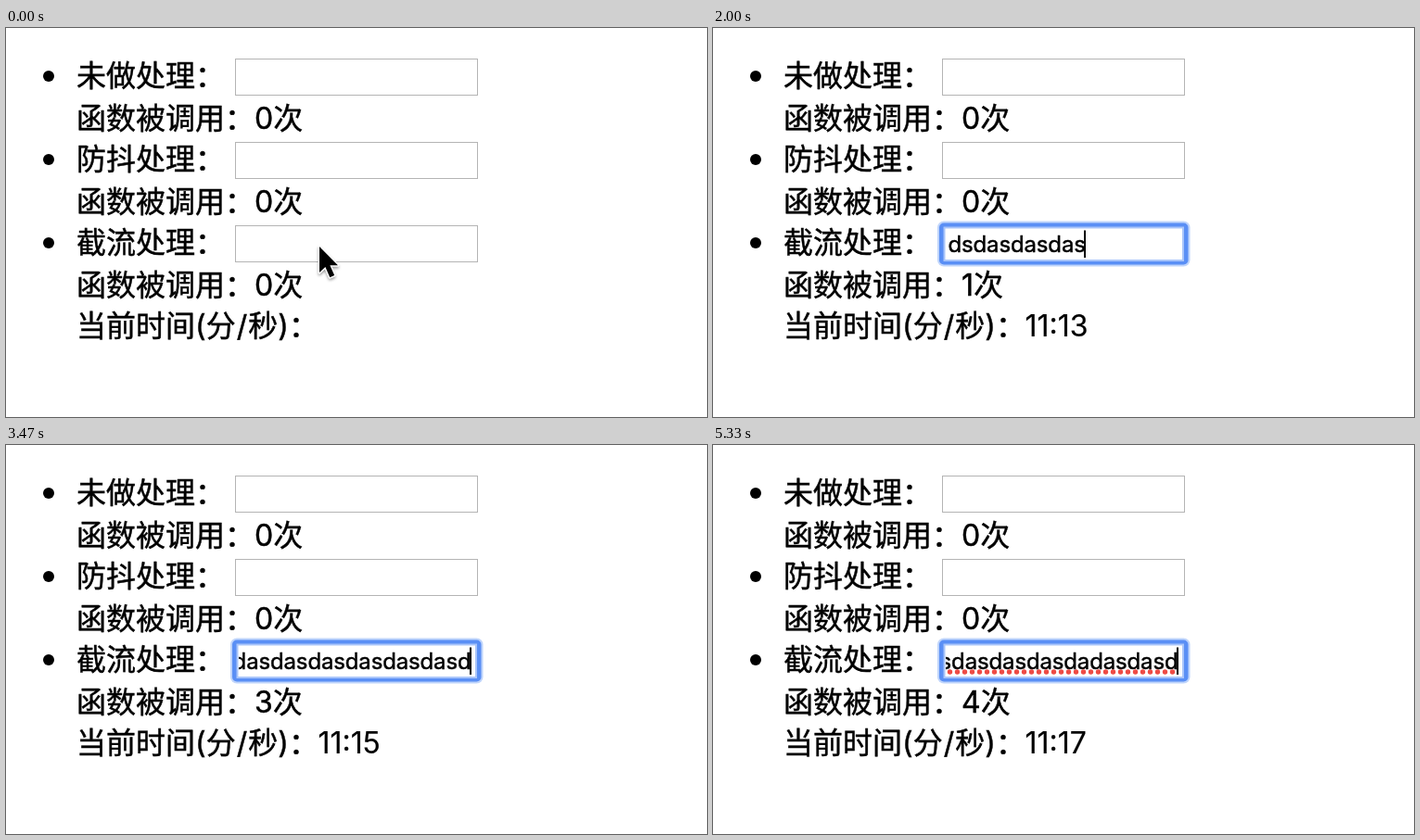
Recreate the animation shown at these times as an HTML page. Size 756 by 420 pixels, loop 5.74 s.

```html
<!DOCTYPE html>
<html lang="zh-CN">
<head>
<meta charset="utf-8">
<style>
  html, body { margin: 0; width: 100%; height: 100%; overflow: hidden; background: #fff; }
  svg { display: block; width: 756px; height: 420px; }
  text {
    font: 32px Inter, "Noto Sans CJK SC", "Noto Sans CJK", sans-serif;
    white-space: pre; stroke: #000; stroke-width: .45px;
  }
  #clock { stroke-width: .2px; }
  #typed { font-size: 24px; letter-spacing: -.15px; }
  .box { fill: #fff; stroke: #b4b4b4; }
  .dots { stroke: #ee4b45; stroke-width: 5.4; stroke-linecap: round; stroke-dasharray: 0 8; }
</style>
</head>
<body>
<svg viewBox="0 0 756 420">
  <defs>
    <clipPath id="inside"><rect x="251" y="216" width="257" height="36"/></clipPath>
    <filter id="soft"><feGaussianBlur stdDeviation=".5"/></filter>
    <filter id="shadow" x="-50%" y="-50%" width="200%" height="200%">
      <feDropShadow dx="0" dy="2" stdDeviation="1.6" flood-opacity=".4"/>
    </filter>
  </defs>

  <circle cx="46" cy="52" r="6"/>
  <text x="76" y="62.5">未做处理：</text>
  <rect class="box" x="247.5" y="33.5" width="261" height="39"/>
  <text x="76" y="108.5">函数被调用：0次</text>

  <circle cx="46" cy="142" r="6"/>
  <text x="76" y="152.5">防抖处理：</text>
  <rect class="box" x="247.5" y="123.5" width="261" height="39"/>
  <text x="76" y="198.5">函数被调用：0次</text>

  <circle cx="46" cy="232" r="6"/>
  <text x="76" y="242.5">截流处理：</text>
  <rect class="box" x="247.5" y="213.5" width="261" height="39"/>
  <text x="76" y="288.5" id="calls"></text>
  <text x="76" y="332.5">当前时间(分<tspan dx="1">/</tspan><tspan dx="1">秒)：</tspan></text>
  <text x="336.5" y="332.5" id="clock"></text>

  <g id="focus">
    <g filter="url(#soft)">
      <rect x="242" y="208.5" width="272.5" height="49" rx="7" fill="#c0d5fb"/>
      <rect x="244" y="210.5" width="268.5" height="45" rx="5" fill="#5a8ff5"/>
      <rect x="248.5" y="214.5" width="259.5" height="37.5" fill="#a9c5fa"/>
      <rect x="250.5" y="216.5" width="255.5" height="33.5" fill="#fff"/>
    </g>
    <g clip-path="url(#inside)">
      <path id="spelling" class="dots" d="M255.5 245H500"/>
      <text id="typed" y="242"></text>
    </g>
    <rect id="caret" y="218.5" width="2" height="29.5"/>
  </g>

  <g id="pointer" filter="url(#shadow)">
    <path d="M0 0V28L6.4 22 11.3 33.2 16.2 31.1 11.4 20.2H20Z"
          stroke="#fff" stroke-width="2.4" paint-order="stroke" stroke-linejoin="round"/>
  </g>
</svg>
<script>
const LOOP = 5740;
const el = id => document.getElementById(id);
const [calls, clock, focus, typed, spelling, caret, pointer] =
  ["calls", "clock", "focus", "typed", "spelling", "caret", "pointer"].map(el);

const FULL = "ds" + "das".repeat(9) + "da" + "dasdasd";

// Key presses: a steady burst at 15 per second, then slower pairs and a last burst.
const burst = (from, n) => Array.from({ length: n }, (_, i) => Math.floor((from + i * 200 / 3) / 10) * 10);
const KEYS = [
  1270, 1330, ...burst(1470, 18),
  2730, 2870, 3000, 3130, 3270, 3330, 3470, 3530, 3670, 3730, 3870,
  3930, 4000, 4070, 4070, 4130, 4200, 4270
];
const CALLS = [[1270, "11:13"], [2330, "11:14"], [3470, "11:15"], [5270, "11:17"]];

const between = (t, a, b) => t >= a && t < b;
const show = (node, on) => node.setAttribute("visibility", on ? "inherit" : "hidden");
const write = (node, s) => { if (node.textContent !== s) node.textContent = s; };

function draw(t) {
  const done = CALLS.filter(([at]) => t >= at);
  write(calls, `函数被调用：${done.length}次`);
  write(clock, done.length ? done[done.length - 1][1] : "");

  write(typed, FULL.slice(0, KEYS.filter(at => t >= at).length));
  const width = typed.textContent ? typed.getComputedTextLength() : 0;
  const end = Math.min(252 + width, 500);
  typed.setAttribute("x", end - width + 1.5);
  caret.setAttribute("x", Math.round(end));

  show(focus, t >= 70);
  show(caret, !between(t, 600, 1130) && !between(t, 4800, 5330));
  show(spelling, t >= 5270);
  show(pointer, t < 70 || between(t, 4470, 4530));
  pointer.setAttribute("transform", t < 70 ? "translate(338 236)" : "translate(609.5 228)");
}

function tick() {
  draw(performance.now() % LOOP);
  requestAnimationFrame(tick);
}
tick();
</script>
</body>
</html>
```
